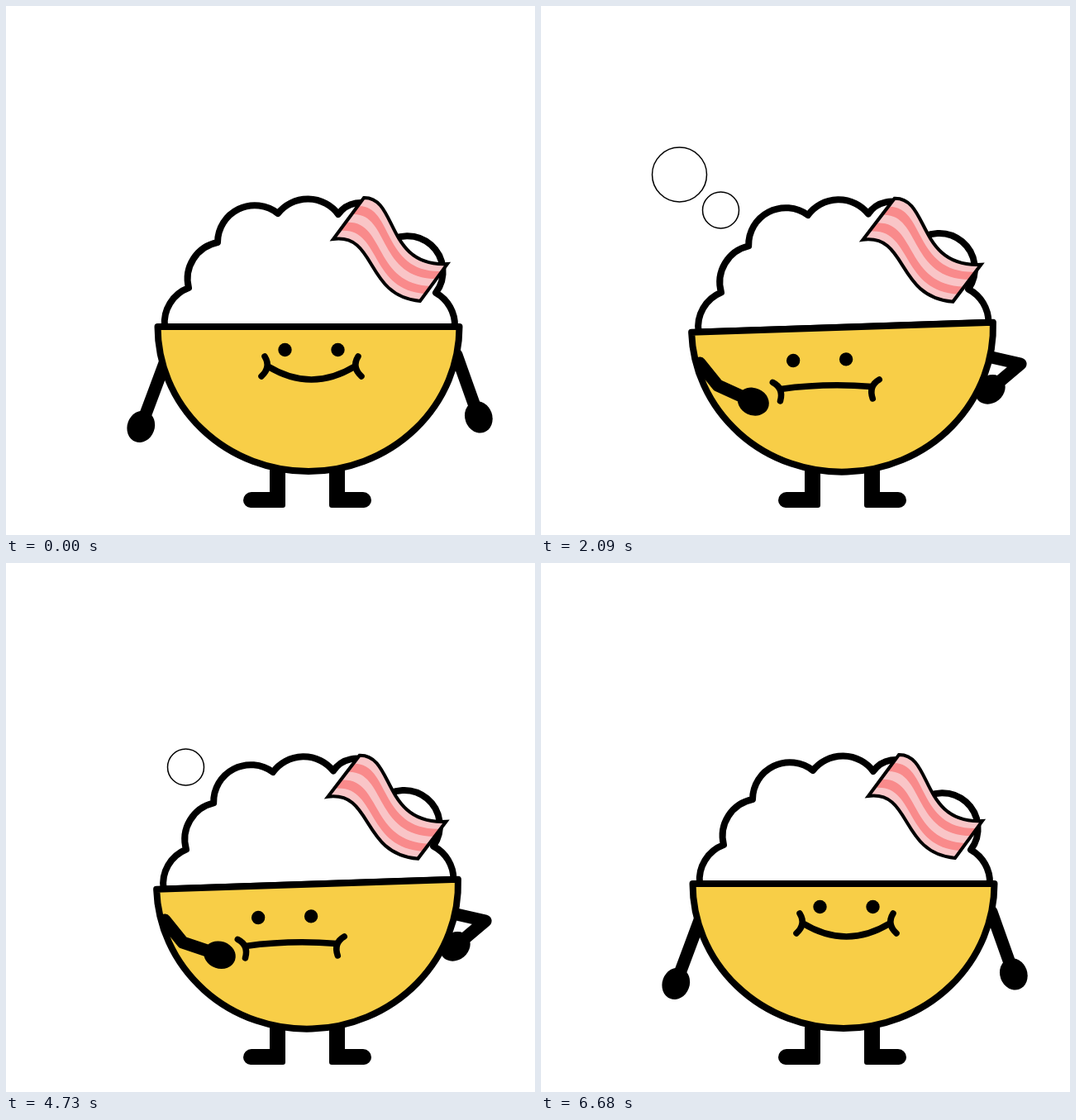
These frames come from a looping animation (640x640 px, 7.31 s). An HTML page with a canvas:

```html
<!DOCTYPE html>
<html lang="en">
<head>
<meta charset="utf-8">
<title>Thinking rice bowl</title>
<style>
html, body { margin: 0; width: 100%; height: 100%; overflow: hidden; background: #fff; }
canvas { display: block; width: 100%; height: 100%; }
</style>
</head>
<body>
<canvas id="stage" width="640" height="640"></canvas>
<script>
const ctx = document.getElementById('stage').getContext('2d');
const LOOP = 7310, RAD = Math.PI / 180;
const THINK = { from: 1280, to: 5810, cycle: 1510, nods: 4 };

// Each lobe: radius and the point where its arc ends
const lobes = [[45, 221, 341], [45, 256, 286], [45, 329, 251], [46, 402, 252],
  [33, 456, 290], [43, 520, 347], [45, 543, 388]];
const rice = new Path2D('M192 388' +
  lobes.map(([r, x, y]) => `A${r} ${r} 0 0 1 ${x} ${y}`).join('') + 'Z');
const bowl = new Path2D('M183.5 388 A182.5 175 0 0 0 548.5 388 Z');

// Bacon edges as cubic control points
const baconTop = [[433, 232], [474, 231], [459, 316], [534, 312]];
const baconLow = [[396, 282], [449, 275], [434, 351], [501, 357]];

const mix = (a, b, k) => a + (b - a) * k;
const clamp = x => Math.min(1, Math.max(0, x));
const ease = (t, from, to) => (1 - Math.cos(Math.PI * clamp((t - from) / (to - from)))) / 2;

function stroke(width, path) {
  ctx.lineWidth = width;
  path ? ctx.stroke(path) : ctx.stroke();
}

function disc(x, y, r) {
  ctx.beginPath();
  ctx.arc(x, y, r, 0, 7);
  ctx.fill();
}

function curve(a, c, b) {
  ctx.beginPath();
  ctx.moveTo(...a);
  ctx.quadraticCurveTo(...c, ...b);
  stroke(7.5);
}

// Runs paint in a moved and turned frame
function within(x, y, angle, paint) {
  ctx.save();
  ctx.translate(x, y);
  ctx.rotate(angle * RAD);
  paint();
  ctx.restore();
}

// Strip of the bacon between two fractions of its width
function strip(from, to, color) {
  const edge = f => baconTop.map((p, i) => p.map((v, j) => mix(v, baconLow[i][j], f)));
  const a = edge(from), b = edge(to).reverse();
  ctx.beginPath();
  ctx.moveTo(...a[0]);
  ctx.bezierCurveTo(...a[1], ...a[2], ...a[3]);
  ctx.lineTo(...b[0]);
  ctx.bezierCurveTo(...b[1], ...b[2], ...b[3]);
  ctx.closePath();
  ctx.fillStyle = color;
  ctx.fill();
}

function bacon(k) {
  within(575, 0.8 * k, 0, () => {
    ctx.scale(1 + 0.037 * k, 1);
    ctx.translate(-575, 0);
    strip(0, 1, '#f9c5c7');
    for (const f of [0.2, 0.6]) strip(f, f + 0.2, '#f98a8b');
    strip(0, 1, 'transparent');
    ctx.lineJoin = 'miter';
    stroke(4);
  });
}

// Two-part arm; angles in degrees, clockwise from the right
function arm(x, y, upper, fore, upperLen, foreLen) {
  const ex = x + upperLen * Math.cos(upper * RAD), ey = y + upperLen * Math.sin(upper * RAD);
  const hx = ex + foreLen * Math.cos(fore * RAD), hy = ey + foreLen * Math.sin(fore * RAD);
  ctx.beginPath();
  ctx.moveTo(x, y);
  ctx.lineTo(ex, ey);
  ctx.lineTo(hx, hy);
  stroke(15);
  ctx.beginPath();
  ctx.ellipse(hx, hy, 19.5, 16.5, fore * RAD, 0, 7);
  ctx.fill();
}

function legs() {
  for (const side of [-1, 1]) {
    within(364.5, 0, 0, () => {
      ctx.scale(side, 1);
      ctx.fillRect(26.5, 555, 19, 45);
      ctx.beginPath();
      ctx.roundRect(26.5, 588, 51, 19, [2, 10, 9, 3]);
      ctx.fill();
    });
  }
}

// Face around the middle of the mouth
function face(k) {
  within(mix(369.5, 345, k), mix(436, 462, k), -1.5 * k, () => {
    const half = mix(52.5, 55, k);
    curve([-half, 0], [0, mix(32, -6, k)], [half, 0]);
    for (const side of [-1, 1]) {
      disc(32 * side - 7 * k, mix(-20, -34, k), 8.2);
      within(half * side, 0, 30 * k * side, () => {
        ctx.scale(side, 1);
        curve([4, -12], [-4, 1], [8, 12]);
      });
    }
  });
}

function thoughts(t) {
  const u = (t - THINK.from) % THINK.cycle;
  if (t < THINK.from || t >= THINK.to || u >= 1450) return;
  const bubbles = [[217.5, 247, 22], [167.5, 204, 33], [88, 113, 75]];
  for (const b of bubbles.slice(0, 1 + Math.floor(u / 500))) {
    ctx.fillStyle = '#fff';
    disc(...b);
    stroke(1.5);
  }
}

function draw(t) {
  // k: 0 cheerful, 1 pondering
  const k = ease(t, 160, 920) - ease(t, 5750, 6680);
  const span = clamp((t - THINK.from) / (THINK.to - THINK.from));
  const nod = 5 * (1 - Math.cos(span * THINK.nods * 2 * Math.PI));
  const leftArm = () => arm(192, 432, mix(110.5, 51, k), mix(110.5, 18.4, k) + nod, 35, 47);

  ctx.fillStyle = '#fff';
  ctx.fillRect(0, 0, 640, 640);
  ctx.fillStyle = ctx.strokeStyle = '#000';
  ctx.lineCap = ctx.lineJoin = 'round';

  leftArm();
  arm(545, mix(422, 425, k), mix(70.4, 12.9, k), mix(70.4, 140, k), 36, mix(44, 48, k));
  legs();

  within(366 - 1.5 * k, 388 + 0.7 * k, -1.9 * k, () => {
    ctx.translate(-366, -388);
    ctx.fillStyle = '#fff';
    ctx.fill(rice);
    stroke(8, rice);
    ctx.fillStyle = '#f8ce47';
    ctx.fill(bowl);
    stroke(8, bowl);
  });

  bacon(k);
  ctx.fillStyle = '#000';
  face(k);
  ctx.globalAlpha = clamp(1.4 * k);
  leftArm();
  ctx.globalAlpha = 1;
  thoughts(t);
}

const start = performance.now();
function tick() {
  draw((performance.now() - start) % LOOP);
  requestAnimationFrame(tick);
}
tick();
</script>
</body>
</html>
```
